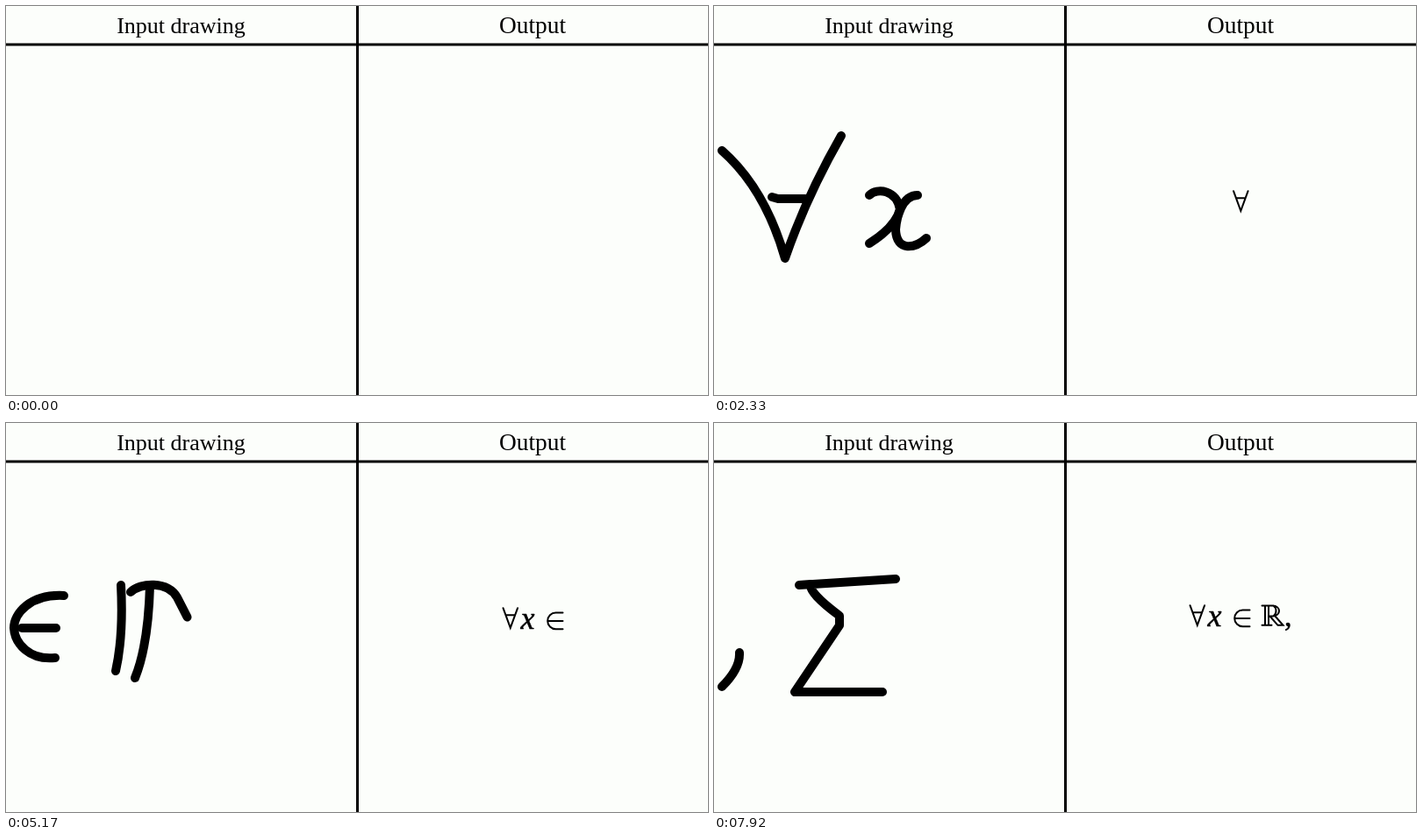
Recreate the animation shown at these times as an HTML page. Size 800 by 444 pixels, loop 8000 ms.

```html
<!DOCTYPE html>
<html lang="en">
<head>
<meta charset="utf-8">
<title>Handwriting to formula</title>
<style>
  html, body { margin: 0; width: 100%; height: 100%; overflow: hidden; background: #fcfefb; }
  svg { display: block; width: 100%; height: 100%; }
  text { font-family: "Liberation Serif", "Times New Roman", serif; }
  path { fill: none; stroke: #000; }
  #ink path { stroke-width: 10; stroke-linecap: round; stroke-linejoin: round; }
  #out path { stroke-width: 2; stroke-linecap: round; }
  #out text { stroke: #000; stroke-width: .5; }
</style>
</head>
<body>
<svg viewBox="0 0 800 444">
  <path d="M0 44H800" stroke-width="2.8"/>
  <path d="M400.5 0V444" stroke-width="3"/>
  <text x="199.5" y="31" font-size="26" text-anchor="middle">Input drawing</text>
  <text x="600" y="31" font-size="27.4" text-anchor="middle">Output</text>
  <g id="ink"></g>
  <g id="out">
    <path d="M1-23.3L9.3-.6L17.6-23.3M4-15.3H14.6"/>
    <text x="21" font-size="36" font-style="italic">x</text>
    <path d="M69-17.9H61A9.3 9.3 0 0 0 61 .7H69M52-8.6H69"/>
    <path d="M83-23H95C105-23 105-11 95-11H90.5M86.5-23V-.7M90.5-23V-.7M83-.7H94M96-23C100-20 100-14 96-11M92-11L101-.7H107L98-11"/>
    <text x="108.5" font-size="34">,</text>
  </g>
</svg>
<script>
const TICK = 1000 / 12, LOOP = 8000, MARGIN = 9;

// done: tick when the symbol is recognised; width: formula width from then on
// strokes: [first tick, ticks, path]
const symbols = [
  { done: 14, width: 18, strokes: [
    [4, 7, "M73 165Q122 208 145 288Q169 218 209 148"],
    [12, 2, "M130 218L137 220H168"]] },
  { done: 30, width: 37, strokes: [
    [15, 6, "M177 216C186 207 208 210 212 232Q207 252 177 271"],
    [24, 5, "M232 216C214 216 208 242 207 255C208 282 230 276 242 265"]] },
  { done: 43, width: 69, strokes: [
    [32, 5, "M179 197C140 195 122 218 122 234C123 252 140 271 169 268"],
    [39, 2, "M131 234H170"]] },
  { done: 71, width: 107, strokes: [
    [51, 3, "M164 186Q162 254 147 291"],
    [56, 3, "M131 185Q134 243 125 283"],
    [60, 9, "M142 193C153 182 184 180 195 199L213 234Q210 244 164 248Q185 252 211 277"]] },
  { done: 79, width: 117, base: 231.5, strokes: [
    [72, 3, "M139 262Q140 280 119 301"]] },
  { done: Infinity, strokes: [
    [87, 9, "M207 178L97 185L110 184Q108 194 143 220V231L92 307H192"]] },
];

const ink = document.getElementById("ink"), out = document.getElementById("out");

function add(parent, tag) {
  return parent.appendChild(document.createElementNS("http://www.w3.org/2000/svg", tag));
}

function show(el, on) {
  el.style.display = on ? "" : "none";
}

for (const s of symbols) {
  s.group = add(ink, "g");
  s.paths = s.strokes.map(([, , d]) => {
    const path = add(s.group, "path");
    path.setAttribute("d", d);
    path.setAttribute("pathLength", 1);
    return path;
  });
  s.shift = MARGIN - s.group.getBBox().x;
}

function draw(time) {
  const tick = Math.floor((time % LOOP + 4) / TICK) % 96;
  symbols.forEach((s, i) => {
    const done = tick >= s.done, next = symbols[i + 1];
    show(s.group, !next || tick < next.done);
    s.group.setAttribute("transform", `translate(${done ? s.shift : 0} 0)`);
    s.strokes.forEach(([start, count], j) => {
      const part = Math.min(1, Math.max(0, (tick - start + 1) / count));
      const drawn = 1 - (1 - part) ** 1.3;
      show(s.paths[j], part > 0);
      s.paths[j].setAttribute("stroke-dasharray", part < 1 ? `${drawn} 2` : "none");
    });
    if (!next) return;
    show(out.children[i], done);
    if (done) out.setAttribute("transform", `translate(${600 - s.width / 2} ${s.base || 234.5})`);
  });
}

function loop(now) {
  draw(now);
  requestAnimationFrame(loop);
}
draw(0);
requestAnimationFrame(loop);
</script>
</body>
</html>
```
